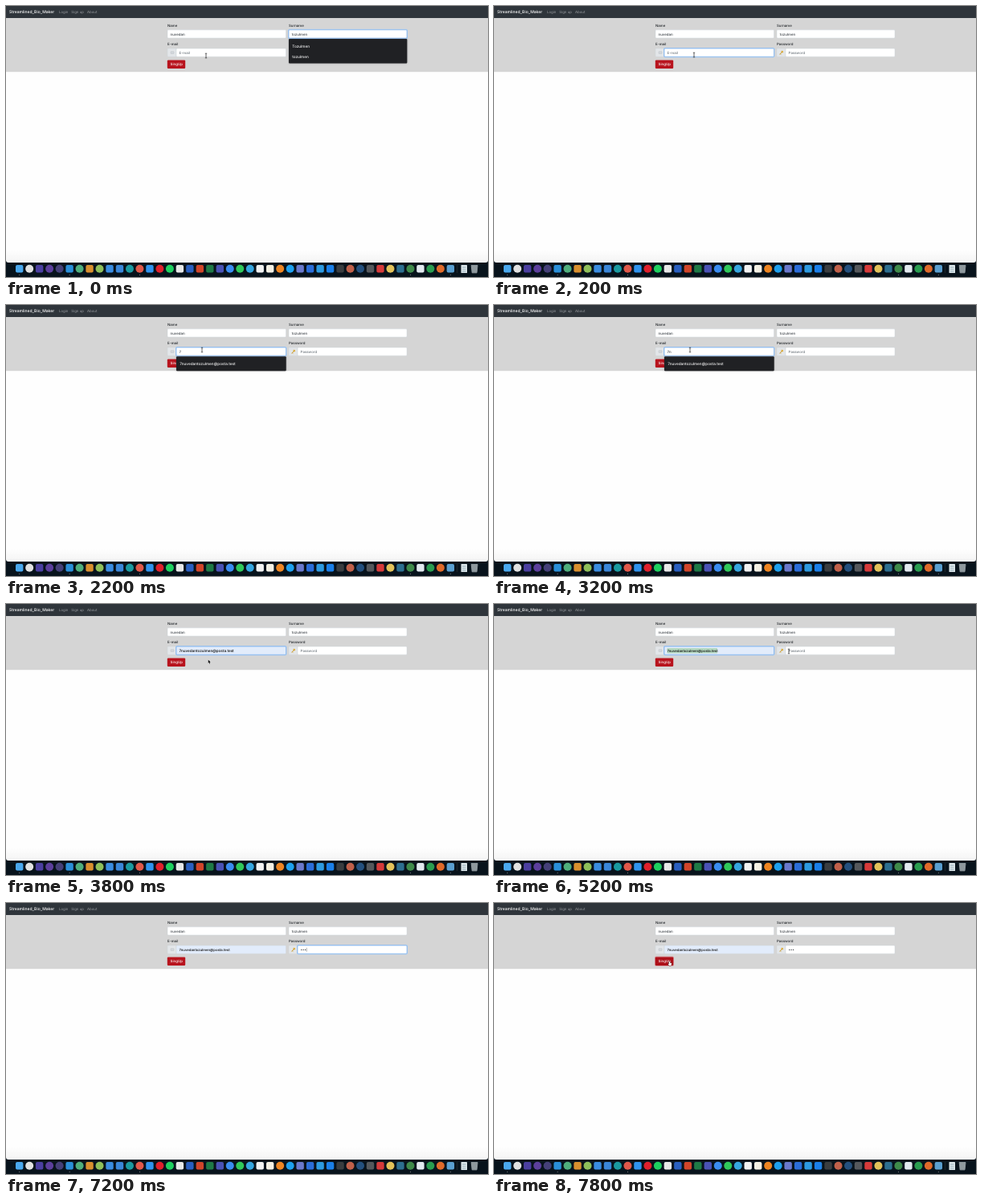
Recreate the animation shown at these times as an HTML page with a canvas. Size 600 px wide and 338 px high, loop 8 s.

```html
<!DOCTYPE html>
<html lang="en">
<head>
<meta charset="utf-8">
<title>Sign up form</title>
<style>
  html, body { margin: 0; width: 100%; height: 100%; overflow: hidden; background: #fefefe; }
  canvas { display: block; width: 600px; height: 338px; }
</style>
</head>
<body>
<canvas id="stage"></canvas>
<script>
const W = 600, H = 338, LOOP = 8000, STEP = 200;
const canvas = document.getElementById('stage');
const ctx = canvas.getContext('2d');
const dpr = window.devicePixelRatio || 1;
canvas.width = W * dpr;
canvas.height = H * dpr;
ctx.textRendering = 'geometricPrecision';

const FIRST = 'nuvedan', LAST = 'tozulmen', LAST_CAP = 'Tozulmen';
const MAIL = '7nuvedantozulmen@posta.test';
const OLD_MAIL = 'nvdmtozen1@posta.test', OLD_NAME = 'nuve tozulmen';
const BRAND = 'Streamlined_Bio_Maker';
const INK = '#212529', INPUT = '#3c4248', HINT = '#70787f', LIGHT = '#f4f4f4';

// Dock icons from left to right: o = circle, s = square
const DOCK = ('s4aa8ee oe2e2e2 s4b3fa0 o5c3f9c o454078 s2a8fd8 o4fae7c sd98f2e o8fbf5a s3a8ce0 s3a86d8 ' +
  'o1a9aa0 oe0584a s2f93ee oe0202c o1ed05f se8e8e8 s2a5fc0 sd1452a s1f7a46 s4a52b5 o3a8cf0 ' +
  'o30c85a o36a6e0 sf2f2f2 sf4f0e4 oee8522 o1ea0ee s6a78cc s2b6dd8 s2d9ae0 s1b7fe8 s3a3d40 ' +
  'oc0604a o24507e s55585c sd63a3a oe3c25a s2d6f90 o3f8a4a se3eaf0 o2a9d50 oe06a2a s5a9fd0').split(' ');
const RUNNING = [0, 5, 12, 39, 43];

// Pointer path: time, x, y, shape
const POINTER = [
  [0, 249, 62, 'beam'], [200, 249, 61, 'beam'], [400, 249, 60, 'beam'],
  [1800, 249, 60, 'beam'], [2200, 244, 56, 'beam'], [3200, 244, 56, 'beam'],
  [3600, 251.7, 69.5, 'arrow'], [4200, 251.7, 69.5, 'arrow'], [4600, 290, 60, 'beam'],
  [5200, 367, 59, 'beam'], [6200, 367, 59, 'none'], [7400, 330, 63, 'arrow'],
  [7600, 258, 71, 'arrow'], [7800, 218, 73, 'hand']
];

function box(x, y, w, h, fill, r = 0, stroke) {
  ctx.beginPath();
  ctx.roundRect(x, y, w, h, r);
  ctx.fillStyle = fill;
  ctx.fill();
  if (!stroke) return;
  ctx.strokeStyle = stroke;
  ctx.lineWidth = 0.5;
  ctx.stroke();
}

function dot(x, y, r, fill) {
  ctx.beginPath();
  ctx.arc(x, y, r, 0, Math.PI * 2);
  ctx.fillStyle = fill;
  ctx.fill();
}

// y is the middle of the capitals
function text(s, x, y, color = INK, size = 4.4, weight = 500) {
  ctx.font = `${weight} ${size}px Inter, Roboto, sans-serif`;
  ctx.fillStyle = color;
  ctx.fillText(s, x, y + size * 0.36);
}

function poly(points, fill, stroke) {
  ctx.beginPath();
  points.forEach(([x, y]) => ctx.lineTo(x, y));
  ctx.closePath();
  ctx.lineWidth = 0.7;
  ctx.lineJoin = 'round';
  ctx.strokeStyle = stroke;
  ctx.stroke();
  ctx.fillStyle = fill;
  ctx.fill();
}

function field(x, y, w, focused, fill = '#fff') {
  if (focused) box(x - 1, y - 1, w + 2, 12.2, '#a9cbf2', 1.6);
  box(x, y, w, 10.2, fill, 1, focused ? '#5c9ae0' : '#ced4da');
}

function addon(x) {
  box(x, 53, 11, 10.2, '#e3e6e9', 1, '#ced4da');
}

function popup(x, y, w, h) {
  ctx.save();
  ctx.shadowColor = 'rgba(0,0,0,.35)';
  ctx.shadowBlur = 2 * dpr;
  box(x, y, w, h, '#202124', 1);
  ctx.restore();
}

function keyIcon() {
  ctx.strokeStyle = '#c99a2c';
  ctx.lineWidth = 1;
  ctx.beginPath();
  ctx.moveTo(355.6, 60.4);
  ctx.lineTo(358.2, 57.8);
  ctx.moveTo(356.3, 59.7);
  ctx.lineTo(357.2, 60.6);
  ctx.stroke();
  dot(358.8, 57.1, 1.4, '#d9a93a');
  dot(359.2, 56.7, 0.4, '#f3ead0');
}

function navbar() {
  box(0, 0, W, 15, '#2f353b');
  text(BRAND, 4, 7.2, '#fff', 5);
  [['Login', 66], ['Sign up', 81.3], ['About', 101]].forEach(([s, x]) => text(s, x, 7.2, '#9a9da0', 4.4, 400));
}

function dock() {
  const shade = ctx.createLinearGradient(0, 304, 0, 320);
  shade.addColorStop(0, '#fefefe');
  shade.addColorStop(1, '#f4f4f4');
  box(0, 312, W, 26, '#08131c');
  box(0, 304, W, 16, shade, [0, 0, 3, 3]);
  DOCK.forEach((icon, i) => {
    const x = 16.7 + 12.48 * i, color = '#' + icon.slice(1);
    if (icon[0] === 'o') dot(x, 327.8, 5, color);
    else box(x - 4.7, 323.1, 9.4, 9.4, color, 2);
  });
  RUNNING.forEach(i => dot(16.7 + 12.48 * i, 335.3, 0.5, '#aaa'));
  box(561.5, 323, 0.4, 10, '#444');
  box(566.5, 323, 7.5, 10, '#dce6ea', 0.6);
  for (let y = 325; y < 332; y += 1.6) box(568, y, 4.5, 0.5, '#8fa8b4');
  poly([[579.2, 323.5], [587, 323.5], [586, 332.8], [580.2, 332.8]], '#8f999e', '#c5cdd1');
}

function form(t) {
  const onSurname = t < 200;
  const onMail = t >= 200 && t < 5400;
  const onPass = t >= 5400 && t < 7800;
  const typed = t < 2000 ? '' : t < 2800 ? '7' : '7n';
  const filled = t >= 3600;

  box(0, 14, W, 68.2, '#d5d5d5');
  text('Name', 201, 24);
  text('Surname', 352, 24);
  text('E-mail', 201, 47.4);
  text('Password', 352, 47.4);

  field(201, 29.8, 147.5, false);
  text(FIRST, 204.5, 35, INPUT);
  field(352, 29.8, 147, onSurname);
  text(LAST, 355.8, 35, INPUT);

  addon(201);
  box(205, 56.8, 4, 2.7, '#d3d8dc', 0.3, '#bcc3c9');
  field(212, 53, 136.5, onMail, filled ? '#e2ecfb' : '#fff');
  if (t >= 4800 && t < 5400) box(215.5, 55, 62.5, 6.4, '#b5d8c0');
  if (filled) text(MAIL, 215.6, 58.2, '#0a0a0a', t < 4000 ? 4.6 : 4.25);
  else if (typed) text(typed, 215.6, 58.2, INPUT);
  else text('E-mail', 215.6, 58.2, HINT);

  addon(352);
  keyIcon();
  field(363, 53, 136, onPass);
  const dots = [6200, 6800, 7200].filter(start => t >= start).length;
  if (!dots) text('Password', 366.6, 58.2, HINT);
  for (let i = 0; i < dots; i++) dot(367.8 + i * 2.4, 58.4, 0.7, INPUT);
  if (onPass && t % 1000 < 500) box(366.7 + dots * 2.4, 55.8, 0.4, 5, INPUT);

  const pressed = t >= 7800;
  if (pressed) box(200, 66.6, 24, 12.2, '#d68f95', 1.8);
  box(200.8, 67.4, 22.4, 10.6, pressed ? '#ad1019' : '#b8141e', 1.2);
  text('SingUp', 204.6, 72.8, '#fff');

  if (onSurname) {
    popup(352, 41, 147.3, 30.6);
    text(LAST_CAP, 356.2, 50, LIGHT, 4.7);
    text(LAST, 356.2, 63, LIGHT, 4.7);
  } else if (t >= 400 && t < 2000) {
    popup(212, 64.2, 136.7, 40.2);
    text(OLD_MAIL, 216.2, 73, LIGHT, 4.7);
    text(OLD_NAME, 216.2, 81, '#d6d7d9', 4.3);
    box(212, 90, 136.7, 0.4, '#34363a');
    text('Yönet...', 216.2, 98, '#e2e3e5', 4.5);
  } else if (t >= 2000 && t < 3800) {
    popup(212, 64.2, 136.7, 18);
    if (t >= 3600) box(212, 67, 136.7, 12.4, '#3c3e42');
    text(MAIL, 216.2, 73, LIGHT, 4.7);
  }
}

function beam(x, y) {
  ctx.strokeStyle = '#222';
  ctx.lineWidth = 0.7;
  ctx.beginPath();
  ctx.moveTo(x, y - 2.6);
  ctx.lineTo(x, y + 2.6);
  for (const end of [-2.8, 2.8]) {
    ctx.moveTo(x - 1.2, y + end);
    ctx.lineTo(x + 1.2, y + end);
  }
  ctx.stroke();
}

function arrow(x, y) {
  const shape = [[0, 0], [0, 4.4], [1, 3.5], [1.8, 5.2], [2.5, 4.9], [1.8, 3.2], [3.1, 3.1]];
  poly(shape.map(([a, b]) => [x + a, y + b]), '#111', '#fff');
}

function hand(x, y) {
  const shape = [[0, 0], [0.9, 0], [1, 1.6], [3, 2.1], [2.8, 4.2], [2.2, 5], [0, 5], [-1.4, 3], [-0.9, 2.5], [0, 3]];
  poly(shape.map(([a, b]) => [x + a, y + b]), '#fff', '#222');
}

function pointer(t) {
  let i = POINTER.length - 1;
  while (POINTER[i][0] > t) i--;
  const [t0, x0, y0, shape] = POINTER[i];
  const [t1, x1, y1] = POINTER[i + 1] || [LOOP, x0, y0];
  const k = (t - t0) / (t1 - t0);
  const x = x0 + (x1 - x0) * k, y = y0 + (y1 - y0) * k;
  const draw = { beam, arrow, hand }[shape];
  if (draw) draw(x, y);
}

const start = performance.now();

function frame() {
  const t = Math.floor(((performance.now() - start) % LOOP) / STEP) * STEP;
  ctx.setTransform(dpr, 0, 0, dpr, 0, 0);
  box(0, 0, W, H, '#fefefe');
  dock();
  form(t);
  navbar();
  pointer(t);
  requestAnimationFrame(frame);
}

frame();
</script>
</body>
</html>
```
